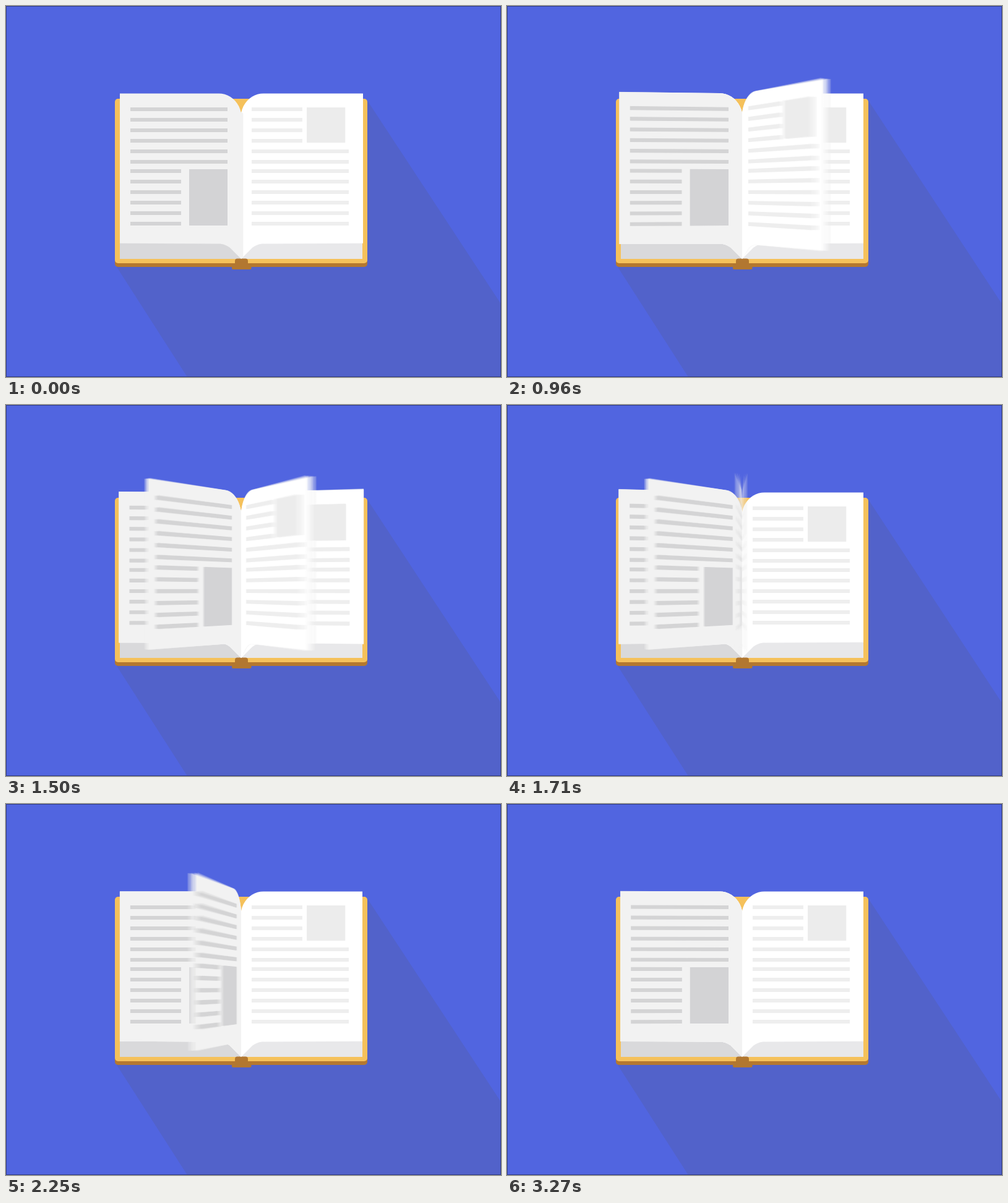
These frames come from a looping animation (800x600 px, 3450 ms). An HTML page with a canvas:

```html
<!DOCTYPE html>
<html lang="en">
<head>
<meta charset="utf-8">
<title>Book</title>
<style>
  html, body { margin: 0; width: 100%; height: 100%; overflow: hidden; background: #5165e0; }
  canvas { display: block; }
</style>
</head>
<body>
<canvas id="stage" width="800" height="600"></canvas>
<script>
const W = 800, H = 600, LOOP = 3450, STEP = 30;
const SPINE = 380, EYE_X = 400, EYE_Y = 300, DEPTH = 1150;
const FLIP = 29, SHUTTER = 0.5, SAMPLES = 15;
const STARTS = [8.3, 25, 35.5, 42.4, 46.9, 63.1, 82.7];  // in steps

const stage = document.getElementById('stage').getContext('2d');
const buffer = document.createElement('canvas');
buffer.width = W;
buffer.height = H;
const g = buffer.getContext('2d');

// Distances are measured from the spine; isShort tells which rows leave room for the picture.
const FRONT = {
  paper: '#ffffff', ink: '#eeeeee', pic: '#ececec',
  near: 17, far: 174, cut: 99, isShort: i => i < 4,
  box: { from: 106, to: 168.3, top: 164, bottom: 221 }
};
const BACK = {
  paper: '#f2f2f2', ink: '#d4d4d5', pic: '#d3d3d5',
  near: 22, far: 179, cut: 97, isShort: i => i > 5,
  box: { from: 22, to: 84, top: 264, bottom: 355 }
};
const ROWS = 12, PITCH = 17;
const rowY = i => 167 + PITCH * i - (i > 5 ? 2 : 0);

function curve(a, b, c, d) {
  return Array.from({ length: 11 }, (_, i) => {
    const t = i / 10, r = 1 - t;
    return [0, 1].map(k =>
      r * r * r * a[k] + 3 * r * r * t * b[k] + 3 * r * t * t * c[k] + t * t * t * d[k]);
  });
}

const outline = width => [
  ...curve([0, 173], [4, 153], [20, 141.5], [36, 141.5]),
  [width, 141.5], [width, 383.7],
  ...curve([36, 384.5], [28, 384.5], [22, 388], [18, 391]),
  [0, 409]
];
const SHEET = outline(196), WIDE = outline(197);

// Eased turn from 0 (right) to PI (left), n in steps since the start.
function turn(n) {
  const x = n / FLIP;
  if (x <= 0) return 0;
  if (x >= 1) return Math.PI;
  let lo = 0, hi = 1;
  for (let i = 0; i < 24; i++) {
    const t = (lo + hi) / 2, r = 1 - t;
    if (0.75 * r * r * t + 1.05 * r * t * t + t * t * t < x) lo = t; else hi = t;
  }
  return Math.PI * lo * lo * (3 - 2 * lo);
}

function project(d, y, angle) {
  const s = DEPTH / (DEPTH - d * Math.sin(angle));
  return [EYE_X + (SPINE - EYE_X + d * Math.cos(angle)) * s, EYE_Y + (y - EYE_Y) * s];
}

function fill(color, pts) {
  g.fillStyle = color;
  g.beginPath();
  for (const [x, y] of pts) g.lineTo(x, y);
  g.fill();
}

function rounded(color, x0, y0, x1, y1, r) {
  g.fillStyle = color;
  g.beginPath();
  g.roundRect(x0, y0, x1 - x0, y1 - y0, r);
  g.fill();
}

function facesUp(angle) {
  return DEPTH * Math.cos(angle) > (EYE_X - SPINE) * Math.sin(angle);
}

function drawPage(angle, shape = SHEET) {
  const face = facesUp(angle) ? FRONT : BACK;
  const poly = (color, pts) => fill(color, pts.map(([d, y]) => project(d, y, angle)));
  const block = (color, a, b, top, bottom) =>
    poly(color, [[a, top], [b, top], [b, bottom], [a, bottom]]);

  poly(face.paper, shape);
  for (let i = 0; i < ROWS; i++) {
    // The text column starts at the left edge of whichever side is showing.
    const short = face.isShort(i);
    const from = short && face === BACK ? face.cut : face.near;
    const to = short && face === FRONT ? face.cut : face.far;
    block(face.ink, from, to, rowY(i) - 3, rowY(i) + 3);
  }
  const { from, to, top, bottom } = face.box;
  block(face.pic, from, to, top, bottom);
}

// The reverse side of a sheet, peeking out along its blurred edge.
function drawReverse(angle) {
  const color = (facesUp(angle) ? BACK : FRONT).paper;
  fill(color, SHEET.map(([d, y]) => project(d, y, angle)));
}

function drawBack() {
  g.fillStyle = '#5165e0';
  g.fillRect(0, 0, W, H);
  fill('#5262ca', [[582, 150], [W, 482], [W, H], [293, H], [177, 419], [400, 300]]);
  g.strokeStyle = '#2f3b87';
  g.strokeRect(0.5, 0.5, W - 1, H - 1);
  rounded('#b5782f', 176, 300, 584, 422, 5);
  rounded('#f5c15b', 176, 150, 584, 416, 5);
  rounded('#d9d9db', SPINE - 196, 383, SPINE, 409, 0);
  rounded('#e8e8ea', SPINE, 383, SPINE + 196, 409, 0);
  rounded('#b27730', 370, 408.5, 391, 424, 4);
  rounded('#b27730', 365, 417, 396.5, 426, 2);
}

function drawScene(n, mixed) {
  drawBack();
  const early = n < STARTS[1];
  drawPage(Math.PI);
  drawPage(0, early ? WIDE : SHEET);
  if (early) fill(BACK.paper, [[379, 173], [380, 171], [383.3, 174], [383.3, 405], [380, 409]]);

  const moving = STARTS
    .map(s => ({ angle: turn(n - s), under: turn(mixed - s) }))
    .filter(p => p.angle > 0 && p.angle < Math.PI);
  const left = moving.filter(p => !facesUp(p.angle));
  const right = moving.filter(p => facesUp(p.angle)).reverse();
  for (const p of [...right, ...left]) {
    drawReverse(p.under);
    drawPage(p.angle);
  }
}

// Averages several moments of the open shutter into one picture.
function render(n) {
  const busy = STARTS.some(s => n > s - 1 && n < s + FLIP + 1);
  const count = busy ? SAMPLES : 1;
  const at = k => n + ((k + 0.5) / count - 0.5) * SHUTTER;
  for (let k = 0; k < count; k++) {
    drawScene(at(k), at((k * 7 + 3) % count));
    stage.globalAlpha = 1 / (k + 1);
    stage.drawImage(buffer, 0, 0);
  }
}

let begin = null, shown = 0;
function tick(now) {
  if (begin === null) begin = now;
  const step = Math.floor(((now - begin) % LOOP) / STEP);
  if (step !== shown) {
    shown = step;
    render(step);
  }
  requestAnimationFrame(tick);
}
render(0);
requestAnimationFrame(tick);
</script>
</body>
</html>
```
